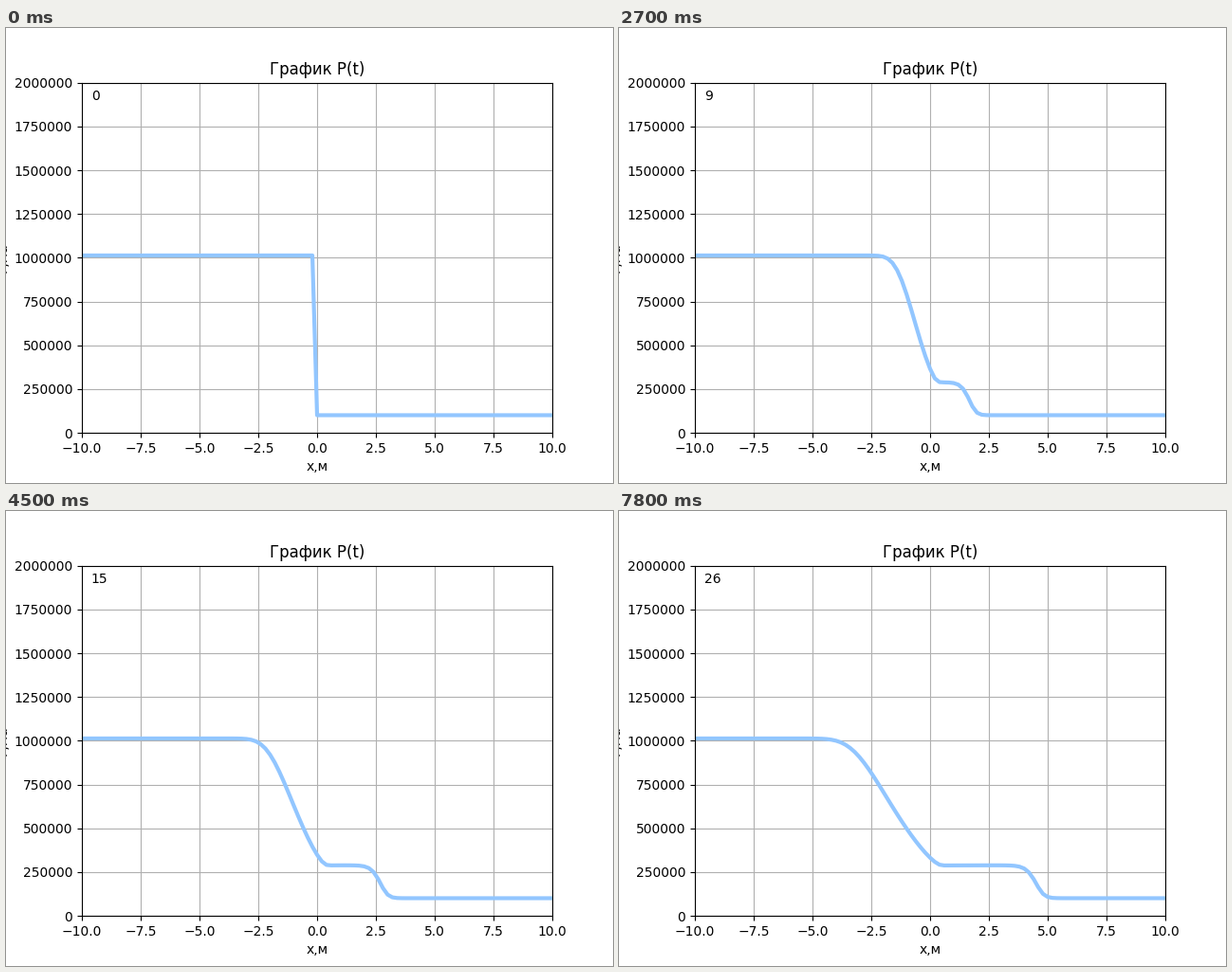
Recreate the animation shown at these times as a matplotlib script. Size 640 px wide and 480 px high, loop 8000 ms.

```python
import numpy as np
import matplotlib.pyplot as plt
from matplotlib.animation import FuncAnimation

GAMMA = 1.4
R_GAS = 287.0
TEMPERATURE = 300.0
P_HIGH, P_LOW = 1013250.0, 101325.0
COURANT = 0.5
STEPS_PER_COUNT = 2
LAST_COUNT = 26
INTERVAL = 100
TICKS_PER_COUNT = 3
FRAMES = 80

x = np.linspace(-10, 10, 101)
dx = x[1] - x[0]


def primitives(q):
    rho, momentum, energy = q
    u = momentum / rho
    p = (GAMMA - 1) * (energy - 0.5 * rho * u**2)
    return rho, u, p, np.sqrt(GAMMA * p / rho)


def hlle_flux(q):
    """Fluxes through the inner cell faces."""
    rho, u, p, c = primitives(q)
    f = np.array([q[1], q[1] * u + p, (q[2] + p) * u])
    enthalpy = (q[2] + p) / rho
    wl, wr = np.sqrt(rho[:-1]), np.sqrt(rho[1:])

    def roe(a):
        return (wl * a[:-1] + wr * a[1:]) / (wl + wr)

    u_roe = roe(u)
    c_roe = np.sqrt((GAMMA - 1) * (roe(enthalpy) - 0.5 * u_roe**2))
    sl = np.minimum(0, np.minimum(u[:-1] - c[:-1], u_roe - c_roe))
    sr = np.maximum(0, np.maximum(u[1:] + c[1:], u_roe + c_roe))
    jump = q[:, 1:] - q[:, :-1]
    return (sr * f[:, :-1] - sl * f[:, 1:] + sl * sr * jump) / (sr - sl)


def advance(q):
    _, u, _, c = primitives(q)
    dt = COURANT * dx / np.max(np.abs(u) + c)
    q = q.copy()
    q[:, 1:-1] -= dt / dx * np.diff(hlle_flux(q), axis=1)
    return q


def pressure_history():
    p = np.where(np.arange(x.size) < x.size // 2, P_HIGH, P_LOW)
    q = np.array([p / (R_GAS * TEMPERATURE), 0 * p, p / (GAMMA - 1)])
    history = [p]
    for _ in range(LAST_COUNT):
        for _ in range(STEPS_PER_COUNT):
            q = advance(q)
        history.append(primitives(q)[2])
    return history


pressures = pressure_history()

fig, ax = plt.subplots(figsize=(6.4, 4.8), dpi=100)
ax.set(xlim=(-10, 10), ylim=(0, 2e6), title="График P(t)",
       xlabel="x,м", ylabel="P,Па")
ax.ticklabel_format(style="plain", axis="y")
ax.grid(True)
line, = ax.plot(x, pressures[0], color="#92c6ff", lw=3)
counter = ax.text(-9.6, 1.9e6, "0")


def update(frame):
    count = min(frame // TICKS_PER_COUNT, LAST_COUNT)
    line.set_ydata(pressures[count])
    counter.set_text(str(count))
    return line, counter


anim = FuncAnimation(fig, update, frames=FRAMES, interval=INTERVAL,
                     repeat=True, repeat_delay=0)
plt.show()
```
